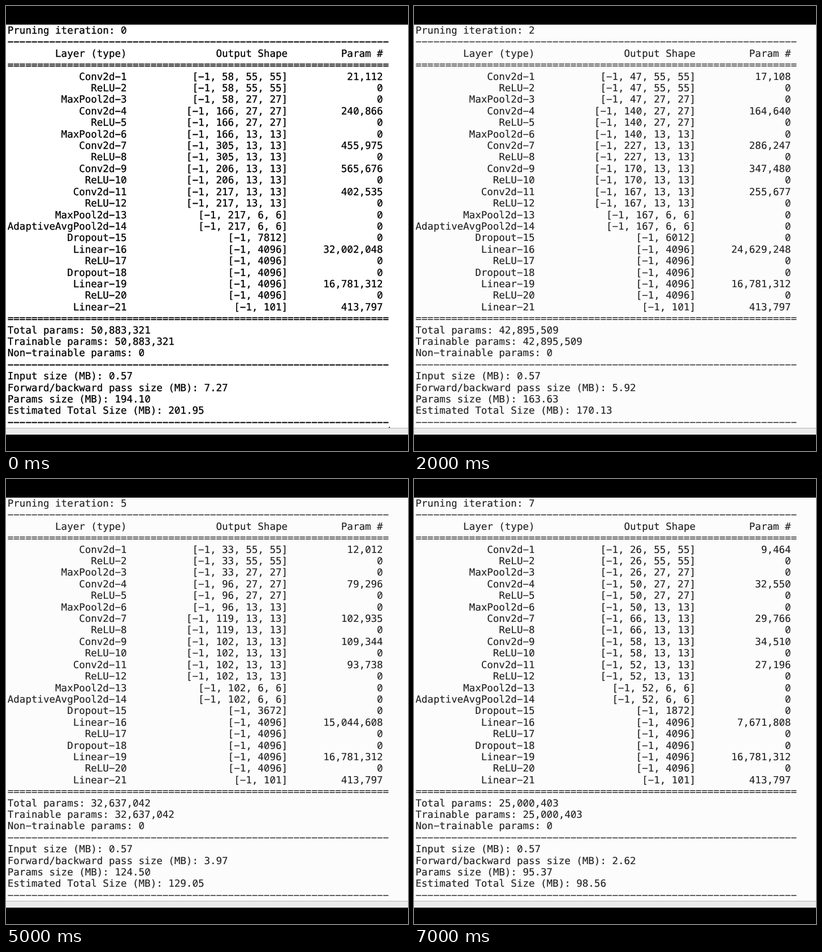
Recreate the animation shown at these times as an HTML page. Size 711 by 788 pixels, loop 8000 ms.

```html
<!DOCTYPE html>
<html lang="en">
<head>
<meta charset="utf-8">
<style>
  html, body { margin: 0; width: 100%; height: 100%; overflow: hidden; background: #000; }
  #page { position: absolute; left: 0; top: 33px; width: 711px; height: 714px; background: #fff; color: #000; }
  #page.dim { background: #fcfcfc; color: #222; }
  #page::after { content: ""; position: absolute; left: 677px; top: 712px; width: 2px; height: 2px; background: #444; }
  #page.dim::after { display: none; }
  #bar { position: absolute; left: 0; top: 747px; width: 711px; height: 11px; background: #ebebeb; border-top: 1px solid #b4b4b4; }
  pre {
    margin: 0; position: absolute; left: 2.8px; top: 1px;
    font: 17.5px/20.41px "DejaVu Sans Mono", monospace;
    text-rendering: geometricPrecision; -webkit-text-stroke: .3px;
  }
  .dim pre { -webkit-text-stroke-width: .15px; }
  /* slashed zero, sized to the same advance */
  b { font: 17.56px/0 "Noto Sans Mono", monospace; }
</style>
</head>
<body>
<div id="page"><pre id="out"></pre></div>
<div id="bar"></div>
<script>
const page = document.getElementById('page');
const out = document.getElementById('out');

// Channels kept in the five convolutions, per pruning iteration
const channels = [
  [58, 166, 305, 206, 217], [50, 153, 262, 193, 194],
  [47, 140, 227, 170, 167], [45, 126, 192, 149, 140],
  [39, 105, 158, 127, 123], [33, 96, 119, 102, 102],
  [30, 73, 92, 80, 77], [26, 50, 66, 58, 52]
];
const dimmed = [1, 2, 5, 6, 7];
const hidden = 4096, classes = 101;

const row = (a, b, c) => a.padStart(20) + b.padStart(27) + c.padStart(16);
const rule = ch => ch.repeat(64);
const group = n => n.toLocaleString('en-US');
const megabytes = n => n * 4 / 2 ** 20;

function summary(iteration) {
  const [c1, c2, c3, c4, c5] = channels[iteration];
  const flat = c5 * 36;
  const rows = [];
  let params = 0, outputs = 0;

  function layer(type, shape, count = 0) {
    params += count;
    outputs += shape.reduce((a, b) => a * b);
    rows.push(row(`${type}-${rows.length + 1}`, `[-1, ${shape.join(', ')}]`, group(count)));
  }
  function conv(input, output, kernel, size) {
    layer('Conv2d', [output, size, size], output * (input * kernel * kernel + 1));
    layer('ReLU', [output, size, size]);
  }
  const pool = (type, c, size) => layer(type, [c, size, size]);
  const linear = (input, output) => layer('Linear', [output], (input + 1) * output);

  conv(3, c1, 11, 55);
  pool('MaxPool2d', c1, 27);
  conv(c1, c2, 5, 27);
  pool('MaxPool2d', c2, 13);
  conv(c2, c3, 3, 13);
  conv(c3, c4, 3, 13);
  conv(c4, c5, 3, 13);
  pool('MaxPool2d', c5, 6);
  pool('AdaptiveAvgPool2d', c5, 6);
  layer('Dropout', [flat]);
  linear(flat, hidden);
  layer('ReLU', [hidden]);
  layer('Dropout', [hidden]);
  linear(hidden, hidden);
  layer('ReLU', [hidden]);
  linear(hidden, classes);

  const sizes = [megabytes(3 * 224 * 224), megabytes(outputs * 2), megabytes(params)];
  sizes.push(sizes[0] + sizes[1] + sizes[2]);
  const [input, pass, weights, total] = sizes.map(n => n.toFixed(2));

  return [
    `Pruning iteration: ${iteration}`,
    rule('-'),
    row('Layer (type)', 'Output Shape', 'Param #'),
    rule('='),
    ...rows,
    rule('='),
    `Total params: ${group(params)}`,
    `Trainable params: ${group(params)}`,
    'Non-trainable params: 0',
    rule('-'),
    `Input size (MB): ${input}`,
    `Forward/backward pass size (MB): ${pass}`,
    `Params size (MB): ${weights}`,
    `Estimated Total Size (MB): ${total}`,
    rule('-')
  ].join('\n');
}

let shown = -1;
function draw() {
  const iteration = Math.floor(performance.now() / 1000) % channels.length;
  if (iteration !== shown) {
    shown = iteration;
    page.className = dimmed.includes(iteration) ? 'dim' : '';
    out.innerHTML = summary(iteration).replace(/-/g, '\u2212').replace(/0/g, '<b>0</b>');
  }
  requestAnimationFrame(draw);
}
draw();
</script>
</body>
</html>
```
